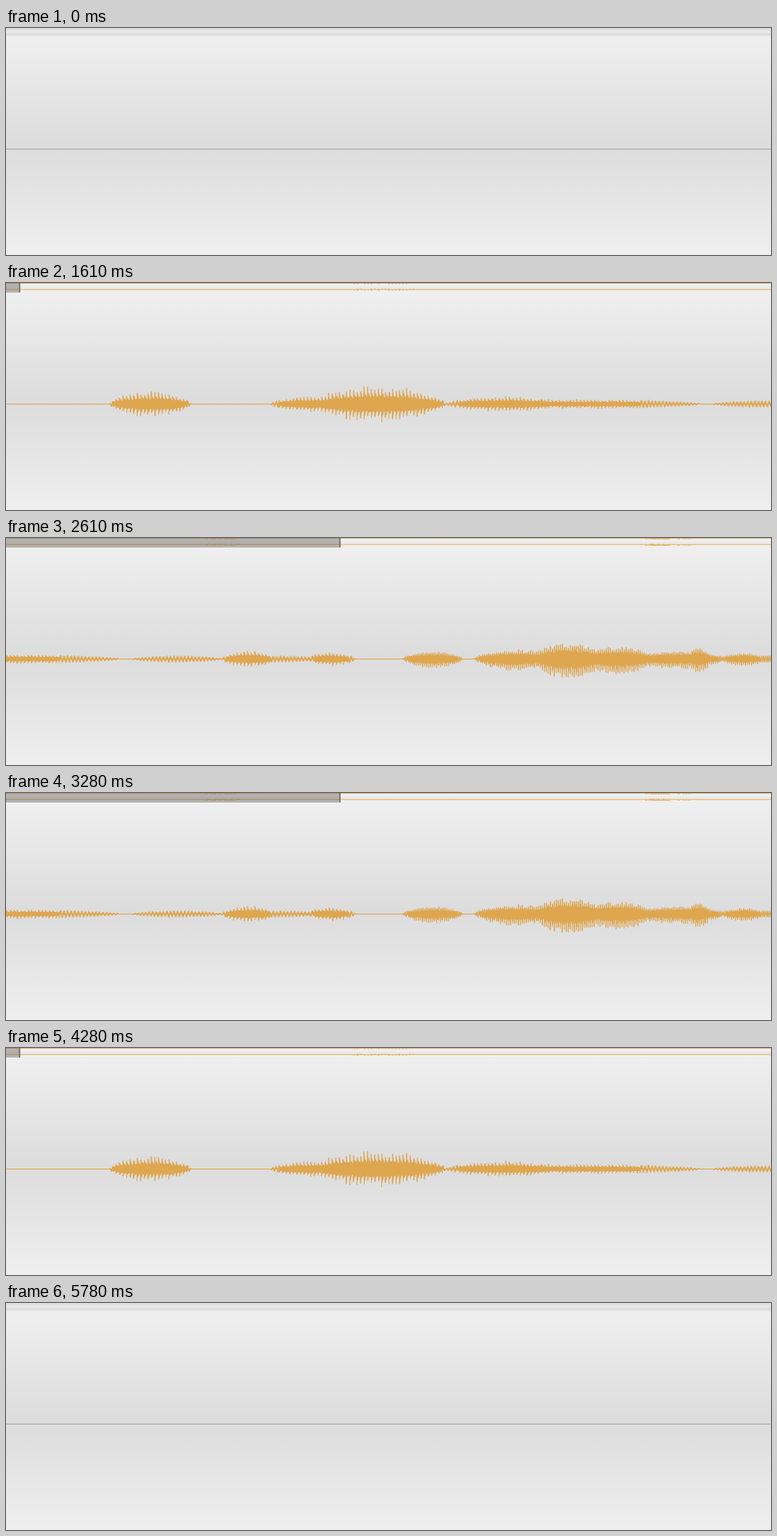
Animation, 960 px wide and 286 px high, one loop 5940 ms. Source, as an HTML page with a canvas:

```html
<!DOCTYPE html>
<html lang="en">
<head>
<meta charset="utf-8">
<title>Recording waveform</title>
<style>
  html, body { margin: 0; width: 960px; height: 286px; overflow: hidden; }
  body { position: relative; background: #eee; }
  canvas { position: absolute; left: 0; top: 0; }
  #toast {
    position: absolute; left: 435px; top: 268px; width: 109px; height: 30px;
    border-radius: 4px; background: #cacaca; box-shadow: 0 0 2px #aaa;
    color: #222; font: 6.7px/8.5px "Liberation Sans", Arial, sans-serif;
  }
  #toast p { position: absolute; left: 14px; top: 5px; width: 81px; margin: 0; text-align: center; white-space: nowrap; }
  #toast svg { position: absolute; left: 5px; top: 8px; }
</style>
</head>
<body>
<canvas id="stage" width="960" height="286"></canvas>
<div id="toast">
  <svg width="7" height="10" fill="none" stroke="#333" stroke-width=".8">
    <rect x="2.2" y=".4" width="2.2" height="5" rx="1.1" fill="#333"/>
    <path d="M.9 4.2a2.4 2.6 0 0 0 4.8 0M3.3 6.8V8.6M1.8 8.7H4.8"/>
  </svg>
  <p>Starting Recording from<br>Quenbri Orb Tidy Stand</p>
</div>
<script>
const W = 960, H = 286, MID = 152.5, LOOP = 5940, START = 220, STEP = 55.6, TURN = 98;
const ORANGE = '#dfa64e', DENSITY = 4, TOTAL = 1970;
const ctx = document.getElementById('stage').getContext('2d');
const toast = document.getElementById('toast');

// Spoken syllables: start, end, loudness
const syllables = [
  [148, 250, 17], [350, 450, 10], [400, 570, 23], [570, 720, 10], [600, 890, 6],
  [905, 1020, 4], [1018, 1085, 11], [1040, 1145, 4], [1125, 1185, 9],
  [1245, 1320, 11], [1335, 1440, 14], [1405, 1500, 24], [1470, 1560, 19],
  [1530, 1650, 12], [1600, 1632, 17], [1600, 1970, 5], [1645, 1700, 9], [1700, 1960, 12]
];

let seed = 7;
const random = () => (seed = seed * 16807 % 2147483647) / 2147483647;

function loudness(u) {
  return Math.max(.5, ...syllables.map(([a, b, peak]) =>
    u > a && u < b ? peak * Math.sin((u - a) / (b - a) * Math.PI) ** .6 : 0));
}

const samples = Array.from({ length: TOTAL * DENSITY }, (_, i) => {
  const u = i / DENSITY, amp = loudness(u);
  const phase = u / (u < 1230 ? 4.45 : 2.5) % 1;
  const buzz = (i % 2 ? 1 : -1) * (.7 + .3 * random());
  return amp * (amp < 5
    ? .6 * Math.sin(phase * 2 * Math.PI) + .4 * buzz
    : buzz * (.4 + .65 * Math.exp(-4 * phase)));
});

function fade(y, h, ...colours) {
  const g = ctx.createLinearGradient(0, y, 0, y + h);
  colours.forEach((c, i) => g.addColorStop(i / (colours.length - 1), c));
  rect(g, 0, y, W, h);
}

function rect(colour, x, y, w, h) {
  ctx.fillStyle = colour;
  ctx.fillRect(x, y, w, h);
}

function trace(from, to, y, gain) {
  const first = Math.floor(from * DENSITY);
  const last = Math.min(samples.length - 1, Math.ceil(to * DENSITY));
  ctx.beginPath();
  for (let i = first; i <= last; i++) {
    ctx.lineTo((i / DENSITY - from) * W / (to - from), y - Math.round(samples[i] * gain));
  }
  ctx.strokeStyle = ORANGE;
  ctx.lineJoin = 'bevel';
  ctx.stroke();
}

function draw(step) {
  const length = Math.max(0, 40.5 * step - 34.5);
  const offset = Math.max(0, length - W);

  fade(0, 12, '#dedede', '#dedede', '#ebebeb', '#e6e6e6', '#d9d9d9', '#e9e9e9', '#eee');
  fade(12, H - 12, '#efefef', '#dcdcdc', '#efefef');
  rect(length ? ORANGE : '#a4a4a4', 0, 152, W, 1);

  if (length) {
    rect('#f0f0f0', 0, 1, W, 10);
    rect('#eaeaec', 0, 4, W, 3);
    rect('#ecd9bd', 0, 7, W, 1);
    trace(offset, length, MID, 1);
    trace(0, length, .5, .03);
    trace(0, length, 8.5, .03);
  }
  if (offset) {
    const x = Math.round(W * offset / length);
    rect('rgba(95,92,86,.42)', 0, 0, x, 12);
    rect('rgba(80,80,80,.5)', x - 2, 0, 2, 12);
  }
  toast.style.opacity = step < 0 ? 0 : Math.max(0, Math.min(1, (22 - step) / 5));
}

let shown = null;
function tick() {
  const t = performance.now() % LOOP;
  const n = t < START ? -1 : Math.floor((t - START) / STEP + .1);
  const step = Math.min(n, TURN - n);
  if (step !== shown) draw(shown = step);
  requestAnimationFrame(tick);
}
tick();
</script>
</body>
</html>
```
